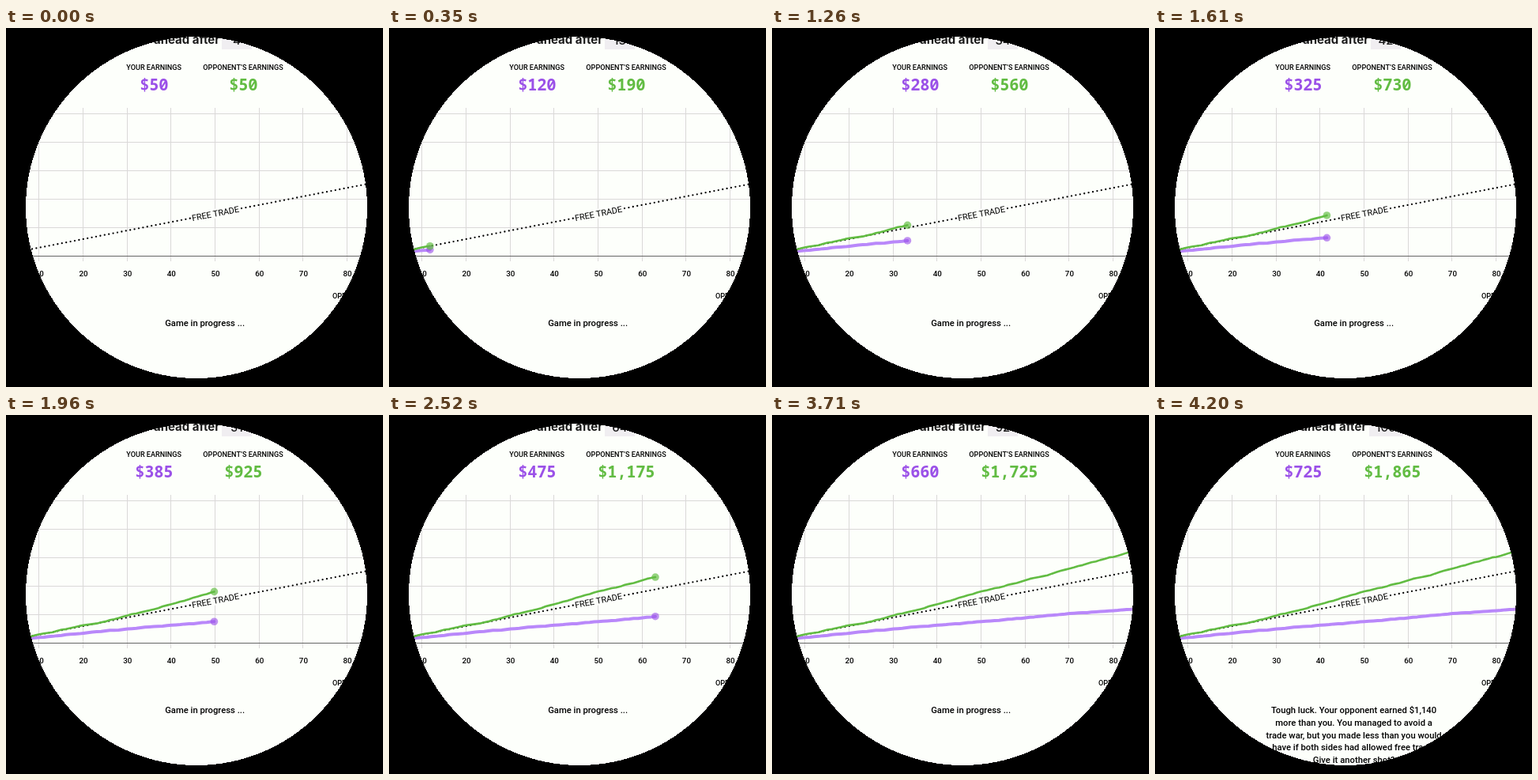
Animation of 477x454 px, one loop 4.27 s. Source, as an HTML page:

```html
<!DOCTYPE html>
<html lang="en">
<head>
<meta charset="utf-8">
<title>Trade game</title>
<style>
  html, body { margin: 0; width: 100%; height: 100%; overflow: hidden; background: #000; }
  svg { display: block; width: 477px; height: 454px; }
  text { font-family: Roboto, "Liberation Sans", sans-serif; fill: #000; text-anchor: middle; }
  .title { font: 700 15px Inter, "Liberation Sans", sans-serif; fill: #1a1a1a; }
  .head { font-size: 9.1px; font-weight: 500; }
  .money { font: 700 20.5px "Noto Sans Mono", "DejaVu Sans Mono", monospace; letter-spacing: -.3px; }
  .tick { font-size: 9.8px; font-weight: 500; }
  .note { font-size: 11.25px; font-weight: 500; }
  .grid path { stroke: #dad8d8; }
  .line { fill: none; stroke-linejoin: round; stroke-linecap: round; }
</style>
</head>
<body>
<svg viewBox="0 0 477 454">
  <rect width="477" height="454" fill="#fdfffb"/>
  <text id="title" class="title" y="20" style="text-anchor:end">ahead after</text>
  <rect id="chip" y="4" height="23" fill="#f0eef1"/>
  <text id="round" class="title" x="292" y="20.5" style="font-weight:500"></text>

  <text class="head" x="187.1" y="53.2">YOUR EARNINGS</text>
  <text class="head" x="300" y="53.2">OPPONENT’S EARNINGS</text>
  <text id="youSum" class="money" x="187.3" y="79" style="fill:#9b51e8"></text>
  <text id="oppSum" class="money" x="300.2" y="79" style="fill:#62bc43"></text>

  <g id="grid" class="grid"></g>
  <path d="M20 288.5H460" stroke="#666"/>
  <g id="free"></g>
  <path id="youLine" class="line" stroke="#b988fa" stroke-width="4"/>
  <path id="oppLine" class="line" stroke="#62bc43" stroke-width="2.6"/>
  <circle id="youDot" r="4.8" fill="#9b51e8" fill-opacity=".62"/>
  <circle id="oppDot" r="4.8" fill="#62bc43" fill-opacity=".68"/>

  <text class="head" x="413" y="341.5" style="text-anchor:start">OPPONENT</text>
  <g id="note"></g>

  <!-- black surround with a round window -->
  <path d="M0 0H477V454H0ZM25 227a216 216 0 0 0 432 0a216 216 0 0 0 -432 0Z"
    fill-rule="evenodd" shape-rendering="crispEdges"/>
</svg>
<script>
const LOOP = 4270, STEP = 70, ROUNDS = 100;

// Totals at a few rounds; the rounds between are random gains
const MARKS = [0, 4, 21, 34, 51, 64, 79, 100];
const YOU = [0, 50, 185, 280, 385, 475, 565, 725];
const OPP = [0, 50, 325, 560, 925, 1175, 1505, 1865];

const RESULT = [
  "Tough luck. Your opponent earned $1,140",
  "more than you. You managed to avoid a",
  "trade war, but you made less than you would",
  "have if both sides had allowed free trade.",
  "Give it another shot?"
];

const $ = id => document.getElementById(id);
const px = round => -13.3 + 5.567 * round;
const py = money => 288.5 - .072 * money;
const dollars = n => "$" + n.toLocaleString("en-US");
const set = (el, attrs) => { for (const k in attrs) el.setAttribute(k, attrs[k]); };

let seed = 11;
const random = () => (seed = seed * 16807 % 2147483647) / 2147483647;

// Uneven gains that add up to each mark, in units of five dollars
function play(marks) {
  const totals = [0];
  for (let i = 1; i < marks.length; i++) {
    const gains = Array.from({ length: MARKS[i] - MARKS[i - 1] }, () => .5 + random());
    const scale = (marks[i] - marks[i - 1]) / gains.reduce((a, b) => a + b);
    let total = marks[i - 1];
    for (const gain of gains) {
      total += gain * scale;
      totals.push(Math.round(total / 5) * 5);
    }
  }
  return totals;
}

const players = [["you", play(YOU)], ["opp", play(OPP)]];

function drawChart() {
  let grid = "";
  for (let r = 10; r <= 80; r += 10) {
    const x = Math.floor(px(r) - .5) + .5;
    grid += `<path d="M${x} 101V295"/><text class="tick" x="${px(r)}" y="313.8">${r}</text>`;
  }
  for (let y = 108.5; y < 280; y += 36) grid += `<path d="M20 ${y}H460"/>`;
  $("grid").innerHTML = grid;

  const free = x => py(15 * (x + 13.3) / 5.567);
  const dots = (a, b) => `<path d="M${a} ${free(a)}L${b} ${free(b)}" stroke="#000"
    stroke-width="2.3" stroke-linecap="round" stroke-dasharray="0 5.5"/>`;
  $("free").innerHTML = dots(33, 234) + dots(298, 460) +
    `<g transform="translate(265 ${free(265)}) rotate(-11)">
      <rect x="-31" y="-6" width="62" height="12" fill="#fdfffb"/>
      <text y="4" font-size="10.8">FREE TRADE</text></g>`;
}

let ended = null;
function drawNote(over) {
  if (over === ended) return;
  ended = over;
  const lines = over ? RESULT : ["Game in progress ..."];
  $("note").innerHTML = lines.map((line, i) =>
    `<text class="note" x="251.6" y="${377.2 + 15.75 * i}">${line}</text>`).join("");
}

function drawPlayer([name, totals], pos, round) {
  const whole = Math.floor(pos);
  const next = totals[Math.min(whole + 1, ROUNDS)];
  const x = px(pos), y = py(totals[whole] + (next - totals[whole]) * (pos - whole));
  const points = totals.slice(0, whole + 1).map((v, r) => [px(r), py(v)]);
  points.push([x, y]);
  $(name + "Line").setAttribute("d", "M" + points.map(p => p.join(" ")).join("L"));
  set($(name + "Dot"), { cx: x, cy: y });
  $(name + "Sum").textContent = dollars(totals[round]);
}

function draw(time) {
  const t = Math.floor(time % LOOP / STEP) * STEP;
  const pos = Math.min(ROUNDS, 3.45 + .0236 * t);
  const round = Math.min(ROUNDS, Math.round(pos + 1));
  const wide = round === ROUNDS;

  players.forEach(p => drawPlayer(p, pos, round));
  $("round").textContent = round;
  $("title").setAttribute("x", wide ? 267.5 : 270.3);
  set($("chip"), wide ? { x: 271, width: 43 } : { x: 273, width: 38 });
  drawNote(pos === ROUNDS);
}

drawChart();
draw(0);
let start;
requestAnimationFrame(function tick(now) {
  start ??= now;
  draw(now - start);
  requestAnimationFrame(tick);
});
</script>
</body>
</html>
```
